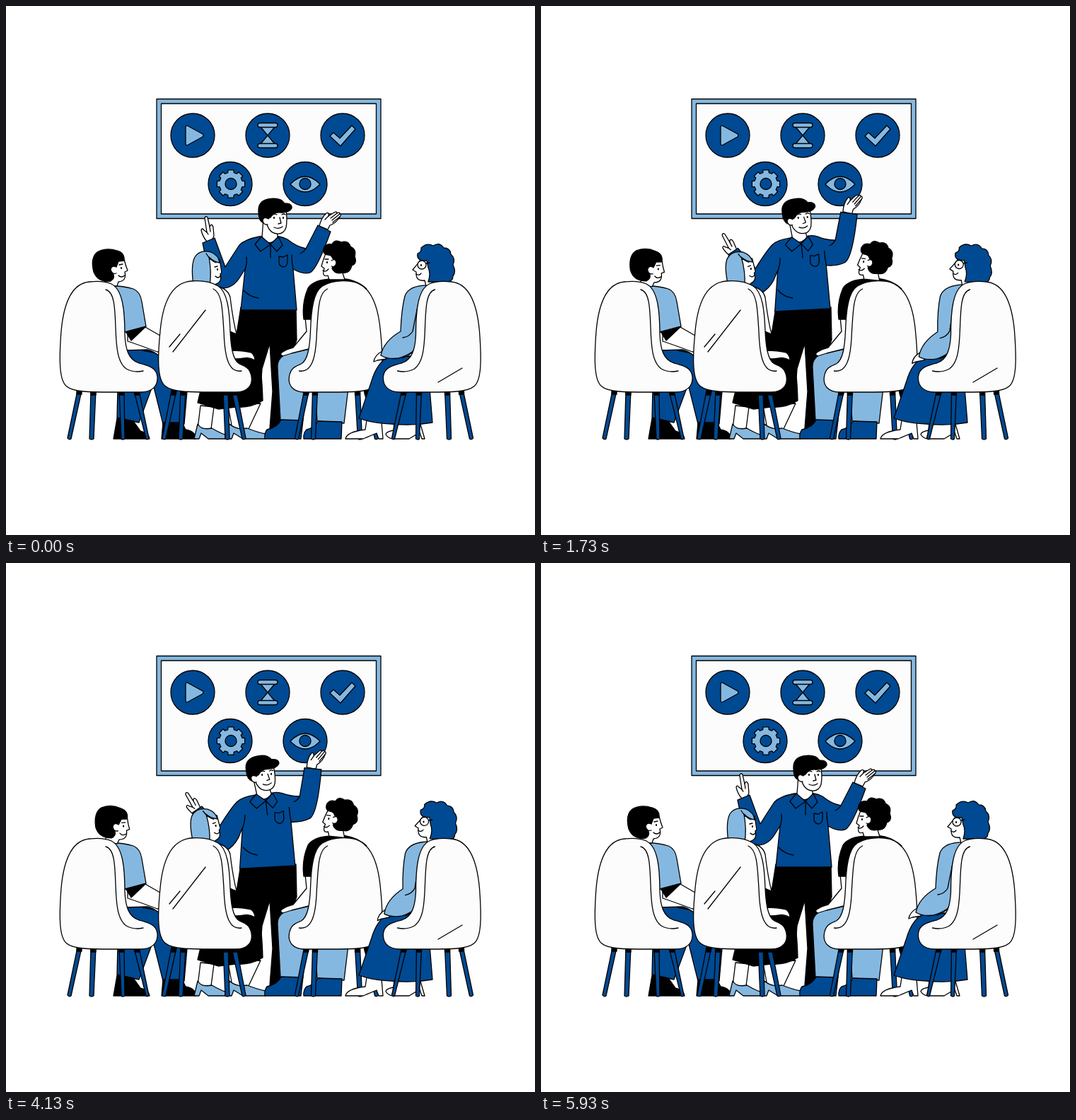
These frames come from a looping animation (748 px wide and 748 px high, 5.99 s). An HTML page:

```html
<!DOCTYPE html>
<html lang="en">
<head>
<meta charset="utf-8">
<title>Team presentation</title>
<style>
  html, body { margin: 0; width: 100%; height: 100%; overflow: hidden; background: #fff; }
  svg { display: block; width: 100vw; height: 100vh; }
  .scene { stroke: #000; stroke-width: 1.3; stroke-linejoin: round; stroke-linecap: round; }
  .dark { fill: #004a93; }
  .light { fill: #85b8e0; }
  .paper { fill: #fcfcfc; }
  .skin { fill: #fff; }
  .black { fill: #000; }
  .line { fill: none; }
</style>
</head>
<body>
<svg viewBox="0 0 748 748">
  <defs>
    <g id="wideChair">
      <g class="dark">
        <path d="M101 544H107L92 612Q89 614 87 611Z"/>
        <path d="M120 544H127L124 612Q121 614 118 612Z"/>
        <path d="M160 544H167L168 612Q165 614 163 612Z"/>
        <path d="M181 544H188L202 611Q200 614 198 612Z"/>
        <path class="black" d="M100 544H107V549H100ZM120 544H127V550H120ZM160 544H167V550H160ZM181 544H188L189 550H182Z"/>
      </g>
      <path class="paper" d="M118 390C95 392 82 415 78 460C75 500 75 530 86 538C95 546 120 546 150 546H190C207 546 215 537 214 524C213 511 200 508 188 505C173 500 169 485 168 465C168 430 165 401 149 393C140 389 128 389 118 390Z"/>
      <path class="line" d="M141 401C153 404 154 425 155 455C156 485 158 504 170 513Q181 519 194 516"/>
    </g>
    <g id="slimChair">
      <g class="dark">
        <path d="M234 544H241L226 612Q223 614 221 611Z"/>
        <path d="M247 544H254L250 612Q247 614 244 612Z"/>
        <path d="M307 544H314L316 612Q313 614 310 612Z"/>
        <path d="M319 544H326L339 611Q337 614 334 612Z"/>
        <path class="black" d="M234 544H241L240 550H233ZM247 544H254V550H247ZM307 544H314V550H307ZM319 544H326L327 550H320Z"/>
      </g>
      <path class="paper" d="M262 389C236 391 222 415 218 460C214 500 214 530 226 538C236 546 260 546 290 546H325C342 546 349 536 347 524C345 511 337 509 330 506C320 500 318 480 317 460C316 430 313 404 300 396C290 390 275 388 262 389Z"/>
      <path class="line" d="M293 400C306 406 306 430 308 460C309 488 312 507 322 514Q327 517 333 516"/>
    </g>
  </defs>

  <g class="scene">
    <!-- board -->
    <rect class="light" x="213" y="131.500" width="317" height="169"/>
    <rect class="paper" x="219.500" y="138" width="304" height="156"/>
    <g class="dark">
      <circle cx="264" cy="183" r="31"/>
      <circle cx="370" cy="183" r="31"/>
      <circle cx="476" cy="183" r="31"/>
      <circle cx="317" cy="251.500" r="31"/>
      <circle cx="423" cy="251.500" r="31"/>
    </g>
    <g class="light">
      <path d="M254 172Q254 168 257 169.500L278 181Q280 183 278 185L257 196.500Q254 198 254 194Z"/>
      <path d="M360 171H380L370 183ZM360 195H380L370 183Z"/>
      <rect x="356" y="165.500" width="28" height="6" rx="3"/>
      <rect x="356" y="194.500" width="28" height="6" rx="3"/>
      <path d="M458 184L463 179L472 187L489 169L494 174L473 198Z"/>
      <path id="gear"/>
      <path d="M402 252Q423 230 444 252Q423 274 402 252Z"/>
    </g>
    <circle class="dark" cx="318" cy="251.500" r="8"/>
    <circle class="dark" cx="423" cy="251.500" r="8"/>

    <!-- presenter -->
    <path class="black" d="M332 426H410L411 472L401 500L392 597H373L377 545L373 477L362 513L358 565H330L326 464Z"/>
    <g class="skin" data-move="3 17 -28.200 308 388">
      <path d="M284 333Q278 326 276 317Q277 313 280 317L284 320L281 300Q282 296 285 299L288 312Q291 306 293 313L294 325L291 332Z"/>
      <path class="line" d="M288 312L289 319M284 320L286 323"/>
    </g>
    <g class="skin" data-move="-24 -32 -15 449 313">
      <path d="M443 311Q446 299 453 293Q457 291 456 297L464 292Q468 290 468 293Q472 291 472 294Q475 295 472 298Q467 307 458 310L455 316Z"/>
      <path class="line" d="M456 297L451 302M468 293L459 300M472 294L461 303M472 298L462 306"/>
    </g>
    <path class="dark"
      d="M358 326Q338 330 330 338Q322 350 310 369L295 328L278 335L287 380Q291 398 308 399Q322 398 331 383L338 372L332 430L411 430L406 372Q420 380 430 377Q440 372 459 319L441 310L424 343Q410 340 398 330Q392 327 386 326Z"
      data-b="M350 329Q332 331 325 338Q316 346 300 372L270 350L258 360L288 398Q297 412 312 410Q322 402 328 390L333 375L330 433L408 427L402 364Q418 362 430 355Q441 346 441 282L415 282L412 325Q398 326 388 324Q378 322 372 325Z"/>
    <path class="line"
      d="M340 355Q341 364 338 373M404 352Q404 362 406 372M336 402Q344 411 357 413M424 343Q421 348 416 350"
      data-b="M337 357Q337 366 333 376M399 343Q400 354 402 364M335 402Q342 411 355 413M412 325Q409 331 404 333"/>
    <path class="skin" d="M364 300L362 327Q372 342 384 328L384 316Z" data-b="M343 300L352 328Q362 340 372 326L367 316Z"/>
    <path class="dark"
      d="M361 326L352 337L360 347L374 337L383 347L391 338L385 326L374 337Z"
      data-b="M351 327L342 338L352 347L365 336L375 346L381 337L374 325L365 336Z"/>
    <path class="line" d="M374 337L374 356" data-b="M365 336L368 356"/>
    <path class="line"
      d="M386 354L392 355L398 352L398 362Q397 369 392 369Q386 368 386 362Z"
      data-b="M378 352L384 353L390 350L391 361Q390 368 385 368Q378 367 378 361Z"/>
    <g data-move="-20 0 -7 378 325">
      <path class="skin" d="M366 290L396 288Q398 303 396 313Q393 323 383 322Q372 321 368 306Z"/>
      <path class="black" d="M364 307Q357 304 357 291Q356 276 371 273Q388 270 394 279Q405 279 404 286Q400 293 388 292Q378 291 374 299L370 301Z"/>
      <path class="skin" d="M371 301Q364 297 363 303Q364 310 370 309"/>
      <path class="line" d="M387 299L389 307L385 308M379 313Q386 316 391 312M376 296Q379 293 383 295M390 295Q393 293 395 295"/>
      <path d="M379 299V300M392 299V300" stroke-width="2"/>
    </g>

    <!-- seated man, left -->
    <path class="dark" d="M168 487L200 486Q216 490 230 510L256 545L252 591L222 591L208 535L188 589L157 582L158 540Z"/>
    <path class="line" d="M193 487L209 490"/>
    <path class="black" d="M157 583L152 612H203Q202 604 190 601L180 587ZM222 589L220 612H268Q268 601 254 599L249 589Z"/>
    <path class="skin" d="M172 462L197 454L230 473V489H214Q190 480 172 474Z"/>
    <path class="black" d="M169 460L197 454L177 473Z"/>
    <path class="light" d="M144 395Q168 396 180 400Q190 404 192 418L198 453L168 461L150 440Z"/>
    <g data-move="0 0 8.500 150 400">
      <path class="skin" d="M148 358L167 358Q169 367 172 374L168 376Q171 389 159 390L157 396H140V386Z"/>
      <path class="black" d="M167 360Q168 349 157 346Q142 341 129 348Q119 356 124 376Q130 391 148 389Q154 385 152 380L151 368L156 369L159 361Z"/>
      <path class="skin" d="M156 369Q149 366 148 373Q150 380 156 378"/>
      <path class="line" d="M159 381Q163 385 168 381M160 366L165 365"/>
      <path d="M163 370V371" stroke-width="2"/>
    </g>

    <!-- seated woman with straight hair -->
    <path class="skin" d="M275 565L271 598H290L294 567ZM314 565L320 598H343L360 562Z"/>
    <path class="light" d="M271 591Q276 600 291 597Q303 604 310 606V612H286L276 604L273 612H266ZM316 591Q326 600 341 597Q356 603 367 605V612H335L322 604L319 612H311Z"/>
    <path class="skin" d="M298 396Q314 400 317 412Q321 445 326 464L316 466Z"/>
    <path class="black" d="M312 458L326 464L346 490L358 506Q362 520 363 558Q345 569 325 567L300 570L271 561L276 540Z"/>
    <path class="skin" d="M318 487Q335 487 347 490Q352 495 352 501Q344 496 336 498Q326 500 318 498Z"/>
    <g data-move="0 0 -8 288 395">
      <path class="skin" d="M284 358H302L305 377L303 379Q306 390 297 393L290 398H280Z"/>
      <path class="light" d="M265 395Q261 366 267 355Q274 344 290 348Q301 353 302 363Q294 362 287 355Q291 376 288 395Z"/>
      <path class="line" d="M283 350Q289 360 297 363M296 382Q300 386 303 382M295 369L299 368"/>
      <path d="M299 372V373" stroke-width="2"/>
    </g>

    <!-- seated man, curly hair -->
    <path class="light" d="M384 512Q383 496 400 491L434 484V530L484 540L478 590L440 587L437 545H424L420 586L388 586Z"/>
    <path class="dark" d="M389 585Q384 596 369 599Q365 604 366 612H417L420 586ZM441 587Q437 596 425 599Q420 604 421 612H474L475 588Z"/>
    <path class="skin" d="M423 440L425 460L406 483Q393 486 388 492L391 495L404 491L432 484L436 440Z"/>
    <path class="black" d="M510 400Q490 382 460 386Q435 387 427 399Q418 420 421 443H440Z"/>
    <g data-move="0 0 8 465 385">
      <path class="skin" d="M452 350Q448 360 446 368L450 371Q446 384 455 381L457 387H479L470 358Z"/>
      <path class="black" d="M459 352Q447 353 449 343Q452 335 461 337Q465 329 474 334Q484 331 487 340Q496 344 493 354Q497 364 489 367Q486 379 476 377Q465 380 461 371L465 362Z"/>
      <path class="skin" d="M460 360Q466 356 467 363Q466 370 460 368"/>
      <path class="line" d="M448 374Q452 377 456 372M451 358L456 358"/>
      <path d="M454 362V363" stroke-width="2"/>
    </g>
    <use href="#slimChair" transform="matrix(-1 0 0 1 747.500 0)"/>

    <!-- seated woman with glasses, in front of her neighbour's chair -->
    <path class="skin" d="M510 586L508 599Q482 602 480 612H505L524 604L527 612H533L531 588ZM549 588L548 600Q537 602 537 606Q541 612 548 612H570L585 603L588 612H592L585 588Z"/>
    <path class="dark" d="M540 496Q524 506 517 530L499 583Q518 590 545 591Q575 594 603 589L599 540L575 495Z"/>
    <g data-move="0 0 -4 575 400">
      <path class="skin" d="M532 488Q521 494 520 503L525 501L538 499Z"/>
      <path class="light" d="M600 395Q570 394 564 410Q559 430 558 460Q534 474 530 494Q540 500 555 498Q572 494 600 470Z"/>
      <path class="line" d="M582 425L575 460Q570 468 561 469M576 487Q572 494 560 498"/>
    </g>
    <g data-move="2.500 0 4 600 400">
      <path class="skin" d="M588 356Q583 364 575 373L580 376Q579 390 592 388L594 396H608L604 360Z"/>
      <path class="dark" d="M595 360Q580 361 582 350Q588 348 587 342Q595 334 604 339Q613 333 619 342Q628 342 629 351Q636 357 632 366Q637 376 632 382Q632 391 620 390H597Q601 378 597 370Z"/>
      <circle class="skin" cx="588" cy="366" r="6"/>
      <path class="line" d="M594 364L599 363M580 379Q584 382 587 378"/>
      <path d="M587 366V367" stroke-width="2"/>
    </g>

    <!-- remaining chairs -->
    <use href="#wideChair"/>
    <use href="#slimChair"/>
    <use href="#wideChair" transform="matrix(-1 0 0 1 747.500 0)"/>
    <path class="line" d="M282 430L236 489M246 464L231 482M645 512L611 532"/>
  </g>
</svg>
<script>
  const LOOP = 5990;
  const NUMBER = /-?\d+(\.\d+)?/g;
  const numbers = text => text.match(NUMBER).map(Number);

  function gearPath(cx, cy, root, tip, teeth) {
    const points = [];
    const add = (r, angle) =>
      points.push((cx + r * Math.cos(angle)).toFixed(2) + ' ' + (cy + r * Math.sin(angle)).toFixed(2));
    for (let i = 0; i < teeth; i++) {
      const mid = i * 2 * Math.PI / teeth;
      add(root, mid - 0.26);
      add(tip, mid - 0.2);
      add(tip, mid + 0.2);
      add(root, mid + 0.26);
    }
    return 'M' + points.join('L') + 'Z';
  }
  document.getElementById('gear').setAttribute('d', gearPath(318, 251.5, 16.5, 20, 8));

  const morphs = [...document.querySelectorAll('[data-b]')].map(el => {
    const shape = el.getAttribute('d');
    return { el, shape, from: numbers(shape), to: numbers(el.dataset.b) };
  });
  const movers = [...document.querySelectorAll('[data-move]')].map(el => ({
    el, move: numbers(el.dataset.move)
  }));

  function pose(k) {
    for (const { el, shape, from, to } of morphs) {
      let i = 0;
      el.setAttribute('d', shape.replace(NUMBER, () => {
        const value = from[i] + (to[i] - from[i]) * k;
        i++;
        return value.toFixed(2);
      }));
    }
    for (const { el, move: [dx, dy, turn, cx, cy] } of movers) {
      el.setAttribute('transform', `translate(${dx * k} ${dy * k}) rotate(${turn * k} ${cx} ${cy})`);
    }
  }

  // The picture holds for 130 ms and 70 ms in turn.
  function heldTime(t) {
    const rest = t % 200;
    return t - rest + (rest >= 130 ? 130 : 0);
  }

  let shown = -1;
  function frame() {
    const t = heldTime(performance.now() % LOOP);
    if (t !== shown) {
      shown = t;
      const sway = (1 - Math.cos(2 * Math.PI * t / LOOP)) / 2;
      pose(sway / 0.94);
    }
    requestAnimationFrame(frame);
  }
  frame();
</script>
</body>
</html>
```
